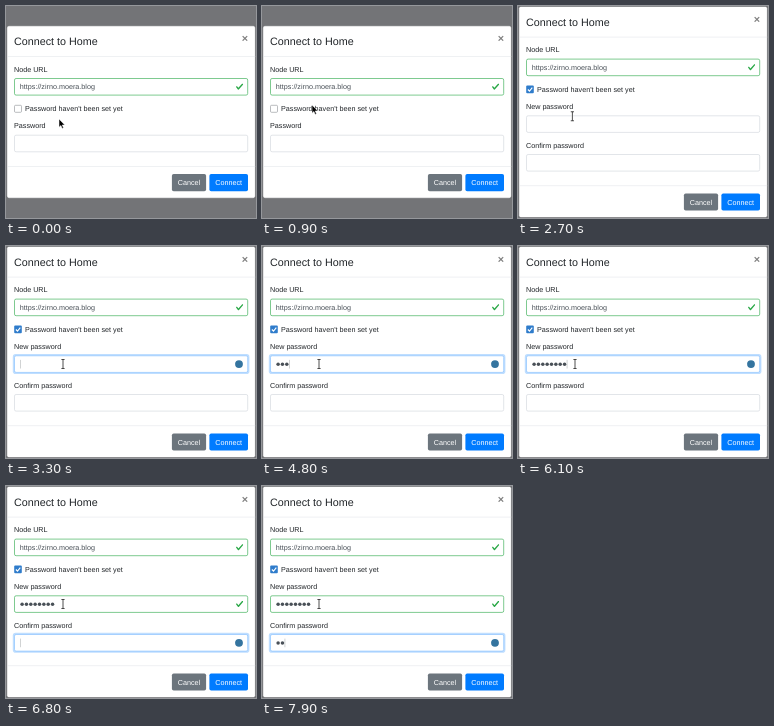
An HTML page for the animation above (8 s loop, 250 px wide and 212 px high).

```html
<!DOCTYPE html>
<html lang="en">
<head>
<meta charset="utf-8">
<title>Connect dialog</title>
<style>
  html, body { margin: 0; width: 100%; height: 100%; overflow: hidden; background: #737477; }
  svg { display: block; width: 250px; height: 212px; }
  text { font: 7.2px "Liberation Sans", Arial, sans-serif; fill: #212529; text-rendering: geometricPrecision; white-space: pre; }
  .title { font-size: 10.75px; }
  .value { fill: #495057; }
  .button { fill: #fff; text-anchor: middle; }
  .close { font-size: 10.8px; font-weight: bold; fill: #7f7f7f; text-anchor: middle; }
</style>
</head>
<body>
<svg id="stage" viewBox="0 0 250 212"></svg>
<script>
const LOOP = 8000, TICK = 100;
const LEFT = 8.2, RIGHT = 242, FIELD_HEIGHT = 17.2;
const GREEN = [40, 167, 69], BLUE = [128, 189, 255], GRAY = [206, 212, 218];
const EXPANDED_AT = 1600, FOCUS_AT = 2700, TAB_AT = 6400;
const passwordKeys = [4100, 4400, 4800, 4900, 5100, 5400, 5800, 6100];
const confirmKeys = [7400, 7800];

const stage = document.getElementById('stage');
const progress = (t, from, to) => Math.min(1, Math.max(0, (t - from) / (to - from)));
const lerp = (a, b, p) => a + (b - a) * p;
const mix = (a, b, p) => `rgb(${a.map((v, i) => Math.round(lerp(v, b[i], p)))})`;
const countKeys = (keys, t) => keys.filter(key => t >= key).length;

const text = (x, y, string, cls = '') => `<text x="${x}" y="${y}" class="${cls}">${string}</text>`;
const rect = (x, y, w, h, fill, r = 0, extra = '') =>
  `<rect x="${x}" y="${y}" width="${w}" height="${h}" rx="${r}" fill="${fill}" ${extra}/>`;
const rule = y => rect(1, y, 248.3, 0.5, '#dee2e6');

const check = y => `<path transform="translate(229.6 ${y + 4.5})" fill="#28a745"
  d="M2.3 6.73L.6 4.53c-.4-1.04.46-1.4 1.1-.8l1.1 1.4 3.4-3.8c.6-.63 1.6-.27 1.2.7l-4 4.6c-.43.5-.8.4-1.1.1z"/>`;

function field(y, { border = GRAY, focus = 0, valid = false, badge = false, dots = 0, caret = false }) {
  let out = '';
  if (focus) {
    out += rect(LEFT - 1.4, y - 1.4, RIGHT - LEFT + 2.8, FIELD_HEIGHT + 2.8, '#bfdeff', 2.8, `opacity="${focus}"`);
  }
  out += rect(LEFT + 0.3, y + 0.3, RIGHT - LEFT - 0.6, FIELD_HEIGHT - 0.6, '#fff', 1.6,
    `stroke="${mix(border, BLUE, focus)}" stroke-width=".6"`);
  for (let i = 0; i < dots; i++) {
    out += `<circle cx="${16.1 + 4.35 * i}" cy="${y + 8.8}" r="1.75" fill="#495057"/>`;
  }
  if (caret) out += rect(14 + 4.35 * dots, y + 4.4, 0.5, 8.6, '#495057', 0, 'opacity=".5"');
  if (valid) out += check(y);
  if (badge) out += `<circle cx="233" cy="${y + 8.6}" r="3.9" fill="#34749f"/>`;
  return out;
}

function checkbox(y, checked, focus) {
  if (!checked) return rect(8.5, y + 0.3, 7, 7, '#fff', 1, 'stroke="#8b8f94" stroke-width=".6"');
  return (focus ? rect(7.5, y - 0.5, 9, 8.6, '#bfdeff', 1.6) : '') +
    rect(8.2, y, 7.6, 7.6, '#2f7ccb', 1) +
    `<path d="M9.9 ${y + 3.9}l1.6 1.7 2.8-3.5" fill="none" stroke="#fff" stroke-width="1.1"/>`;
}

function pointer(t) {
  const rise = progress(t, 500, 900), drop = progress(t, 2200, 3000), settle = progress(t, 3100, 3300);
  const x = lerp(lerp(53, 50, rise), 57, drop);
  const y = lerp(lerp(113, 99, rise), 117, drop) + settle;
  if (t > EXPANDED_AT && y > 109.5) {
    const beam = `M${x - 1.6} ${y - 4.5}h3.2M${x} ${y - 4.5}v9M${x - 1.6} ${y + 4.5}h3.2`;
    return `<path d="${beam}" stroke="#fff" stroke-width="1.6"/><path d="${beam}" stroke="#222" stroke-width=".8"/>`;
  }
  return `<path transform="translate(${x} ${y})" d="M0 0V8.2L1.9 6.5 3.2 9.4 4.5 8.8 3.2 6H5.8Z"
    fill="#000" stroke="#fff" stroke-width=".5"/>`;
}

function render(t) {
  const expanded = t >= EXPANDED_AT;
  const top = expanded ? 0.4 : 19.8;
  const bottom = expanded ? 211.6 : 192.2;
  const tabbed = t > TAB_AT;
  const focused = t > FOCUS_AT && !tabbed;
  const confirmFocus = progress(t, 6500, 6800);

  let out = rect(0, 0, 250, 212, '#737477') +
    rect(0.8, top, 248.6, bottom - top, '#fff', 2.1, 'stroke="#55575a" stroke-width=".5"');

  out += `<g transform="translate(0 ${top})">` +
    text(8, 19.3, 'Connect to Home', 'title') +
    text(238.8, 16.2, '×', 'close') +
    rule(30.4) +
    text(8, 46, 'Node URL') +
    field(52.4, { border: GREEN, valid: true }) +
    text(13.8, 63.4, 'https://zirno.moera.blog', 'value') +
    checkbox(79.2, expanded, t < FOCUS_AT) +
    text(19, 85.7, "Password haven't been set yet") +
    text(8, 102.6, expanded ? 'New password' : 'Password');
  if (expanded) {
    out += field(109.1, {
      border: tabbed ? GREEN : GRAY,
      focus: tabbed ? 1 - progress(t, TAB_AT, 6800) : progress(t, FOCUS_AT, 3000),
      valid: tabbed,
      badge: focused,
      dots: countKeys(passwordKeys, t),
      caret: focused
    }) +
    text(8, 141.4, 'Confirm password') +
    field(147.8, {
      focus: confirmFocus,
      badge: tabbed,
      dots: countKeys(confirmKeys, t),
      caret: tabbed
    });
  } else {
    out += field(109.1, {});
  }
  out += '</g>';

  out += `<g transform="translate(0 ${bottom})">` +
    rule(-32) +
    rect(165.9, -24.2, 34.2, FIELD_HEIGHT, '#6c757d', 1.8) +
    rect(203.4, -24.2, 38.6, FIELD_HEIGHT, '#007bff', 1.8) +
    text(183, -13.1, 'Cancel', 'button') +
    text(222.7, -13.1, 'Connect', 'button') +
    '</g>';

  stage.innerHTML = out + pointer(t);
}

let lastTick = -1;
function animate() {
  const tick = Math.floor(performance.now() % LOOP / TICK);
  if (tick !== lastTick) render((lastTick = tick) * TICK);
  requestAnimationFrame(animate);
}
animate();
</script>
</body>
</html>
```
